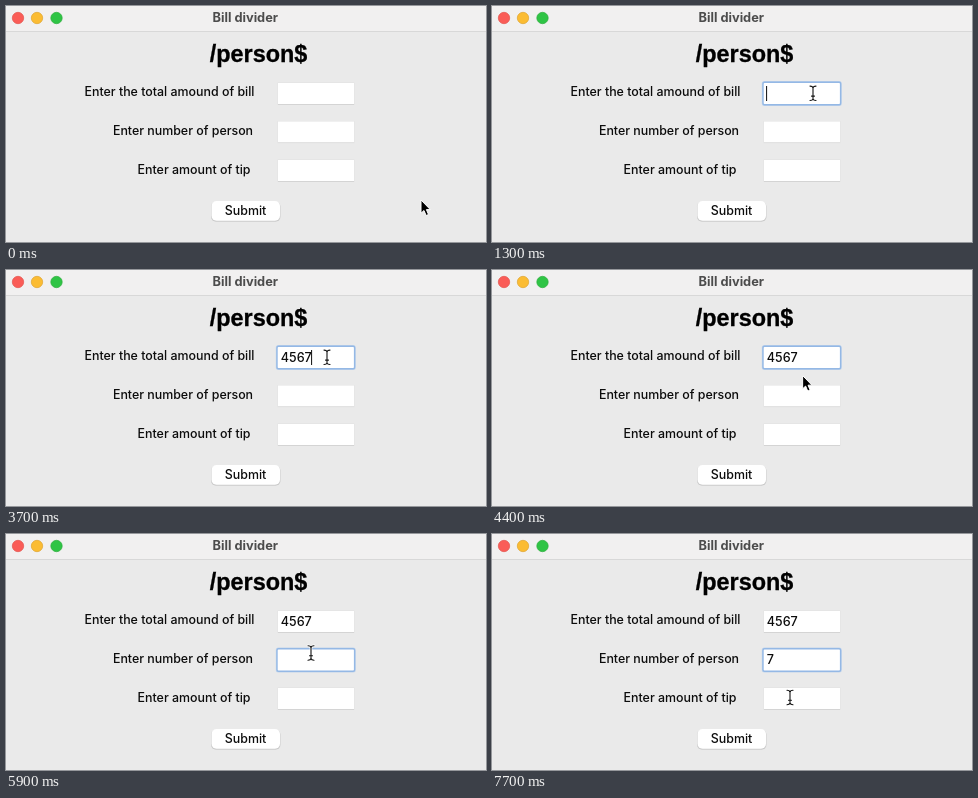
Recreate the animation shown at these times as an HTML page. Size 480 px wide and 236 px high, loop 8000 ms.

```html
<!DOCTYPE html>
<html lang="en">
<head>
<meta charset="utf-8">
<title>Bill divider</title>
<style>
  html, body { margin: 0; height: 100%; overflow: hidden; background: #eaeaea; }
  svg { display: block; }
  text { font: 500 12.4px Inter, sans-serif; fill: #0c0c0c; }
  .mid { text-anchor: middle; }
  .title { font-weight: 700; font-size: 12.8px; fill: #4c4c4c; }
  .head { font: 700 23.4px "Liberation Sans", Arial, sans-serif; fill: #000; stroke: #000; stroke-width: .3; }
  .value { font-size: 12.6px; }
</style>
</head>
<body>
<svg width="480" height="236" viewBox="0 0 480 236">
  <rect width="480" height="236" fill="#eaeaea"/>
  <rect width="480" height="25" fill="#f1f0f0"/>
  <rect y="25" width="480" height="1" fill="#d8d8d8"/>
  <g stroke-width=".7">
    <circle cx="12" cy="12" r="5.7" fill="#fa5c57" stroke="#e2534e"/>
    <circle cx="31" cy="12" r="5.7" fill="#fbbc33" stroke="#dfa42e"/>
    <circle cx="50.5" cy="12" r="5.7" fill="#2fc445" stroke="#2bac3b"/>
  </g>
  <text class="mid title" x="239.3" y="16">Bill divider</text>
  <text class="mid head" x="252.5" y="56.4">/person$</text>
  <text class="mid" x="163.5" y="90.2">Enter the total amound of bill</text>
  <text class="mid" x="177" y="129.2">Enter number of person</text>
  <text class="mid" x="188" y="167.7">Enter amount of tip</text>
  <g id="fields"></g>
  <rect x="205" y="195.7" width="69.5" height="20" rx="5" fill="#cbcbcb"/>
  <rect x="205.5" y="195" width="68.5" height="19.7" rx="5" fill="#fff"/>
  <text class="mid" x="239.5" y="209.3">Submit</text>
  <rect id="caret" width="1.1" height="15" fill="#222"/>
  <g id="pointer">
    <path id="arrow" d="M0 0V13.2L3 10.5L5.1 15.5L7.5 14.5L5.4 9.6H9.3Z" fill="#000" stroke="#fff"/>
    <g id="beam" fill="none" stroke-linecap="round">
      <use href="#beamLine" stroke="#fff" stroke-width="2.6"/>
      <use href="#beamLine" stroke="#111" stroke-width="1.1"/>
    </g>
  </g>
  <defs>
    <path id="beamLine" d="M-3 -7.2Q-.4 -7.2 0 -5.5Q.4 -7.2 3 -7.2M0 -5.5V5.5M-3 7.2Q-.4 7.2 0 5.5Q.4 7.2 3 7.2M-1.5 2.8H1.5"/>
  </defs>
</svg>
<script>
const LOOP = 8000, STEP = 100;
const $ = id => document.getElementById(id);

const tops = [77, 115.5, 154];
$('fields').innerHTML = tops.map(y => `
  <rect x="271.5" y="${y - .5}" width="77" height="22.3" fill="#e2e2e2"/>
  <rect x="272" y="${y + 20}" width="76" height="1.5" fill="#c6c6c6"/>
  <rect x="272" y="${y}" width="76" height="21" fill="#fff"/>
  <g class="ring">
    <rect x="269.8" y="${y - 2}" width="80" height="25" rx="2.5" fill="#c3d5ec"/>
    <rect x="271" y="${y - .8}" width="77.6" height="22.6" rx="1.5" fill="#fff" stroke="#94b8e5" stroke-width="1.4"/>
  </g>
  <text class="value" x="274.8" y="${y + 14.8}"></text>`).join('');
const rings = document.querySelectorAll('.ring');
const values = document.querySelectorAll('.value');

// time, x, y of the pointer's hot spot
const path = [
  [0, 415, 194], [600, 322, 96.3], [900, 321, 87.3], [4100, 321, 87.3],
  [4600, 305, 115.5], [4700, 305, 115.5], [5000, 305, 119],
  [6700, 305, 119], [7600, 298, 163.5], [LOOP, 298, 163.5]
];

function pointerAt(t) {
  const i = path.findIndex(p => p[0] > t);
  const [t0, x0, y0] = path[i - 1], [t1, x1, y1] = path[i];
  const u = (t - t0) / (t1 - t0), k = u * u * (3 - 2 * u);
  return [x0 + (x1 - x0) * k, y0 + (y1 - y0) * k];
}

const show = (el, on) => el.style.display = on ? '' : 'none';
const typed = (text, t, start, gap) =>
  text.slice(0, Math.max(0, Math.floor((t - start) / gap) + 1));

function draw(t) {
  const focus = t < 1000 ? -1 : t < 5300 ? 0 : 1;
  rings.forEach((ring, i) => show(ring, i === focus));
  values[0].textContent = typed('4567', t, 2600, 300);
  values[1].textContent = typed('7', t, 6600, 300);

  // caret: 600 ms on, 300 ms off, counted from the moment of focus
  const since = t - (focus ? 5300 : 1000);
  const blinkOn = focus >= 0 && since % 900 < 600;
  show($('caret'), blinkOn);
  if (blinkOn) {
    $('caret').setAttribute('x', 274 + values[focus].getComputedTextLength());
    $('caret').setAttribute('y', tops[focus] + 3);
  }

  const [x, y] = pointerAt(t);
  const inside = x > 271 && x < 349 && tops.some(top => y >= top - 1 && y <= top + 22);
  $('pointer').setAttribute('transform', `translate(${x} ${y})`);
  show($('arrow'), !inside);
  show($('beam'), inside);
}

const begin = performance.now();
function tick() {
  const t = (performance.now() - begin) % LOOP;
  draw(Math.floor(t / STEP) * STEP);
  requestAnimationFrame(tick);
}
tick();
</script>
</body>
</html>
```
